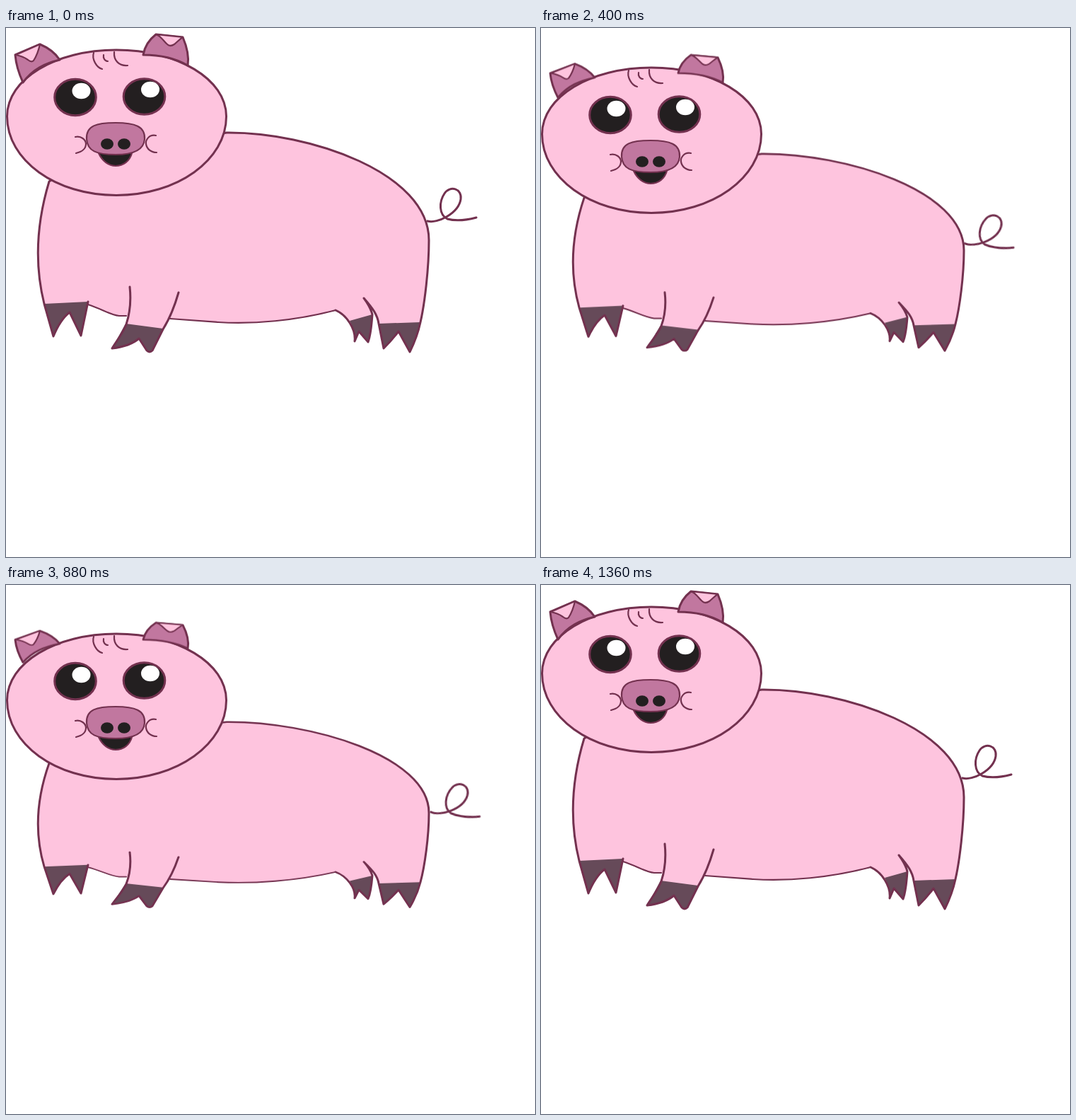
An HTML page that plays this animation: 748x748 px, repeating every 1480 ms.

```html
<!DOCTYPE html>
<html lang="en">
<head>
<meta charset="utf-8">
<title>Bouncing pig</title>
<style>
  html, body { margin: 0; width: 100%; height: 100%; overflow: hidden; background: #fff; }
  svg { display: block; width: 100%; height: 100%; }
  svg * { transform-box: view-box; transform-origin: 0 0; }
  .line { fill: none; stroke: #73314f; stroke-width: 3; stroke-linecap: round; stroke-linejoin: round; }
  .thin { stroke-width: 2.2; }
  .skin { fill: #fec4de; }
  .rose { fill: #c1779f; }
  .hoof { fill: #664a59; }
  .ink { fill: #231f20; }
  .white { fill: #fff; }
</style>
</head>
<body>
<svg viewBox="0 0 748 748">
  <g id="body">
    <path class="skin" d="M90 190 L61 217 C45 270 39 330 54 391 L116 388 V391 C135 397 148 406 160 407 H173 L169 420 L222 427 L232 411 L300 416 C350 419 410 414 466 399 C475 402 482 408 486 415 L518 406 L516 394 L527 419 L586 417 C592 390 598 340 598 300 C598 205 430 147 312 148 L250 170Z"/>
    <g class="hoof">
      <path d="M54 390 L67 436 C74 419 82 408 90 402 L106 435 L116 387Z"/>
      <path d="M169 418 L150 453 C166 451 180 446 188 439 L199 456 Q203 460 207 456 L222 425Z"/>
      <path d="M486 414 C491 424 494 434 493 443 L499 429 L512 444 C516 433 517 420 518 405Z"/>
      <path d="M527 418 L534 453 C542 445 549 437 555 429 L571 458 C578 444 583 430 586 416Z"/>
    </g>
    <g class="line">
      <path d="M66 214 L61 217 C45 270 39 330 54 390 L67 436 C74 419 82 408 90 402 L106 435 L116 387"/>
      <path d="M175 366 C177 385 176 401 170 419 C165 432 156 443 150 453 C166 451 180 446 188 439 L199 456 Q203 460 207 456 L222 426 C232 410 238 395 244 374"/>
      <path d="M466 399 C482 406 495 426 493 443 L499 429 L512 444 C516 433 517 420 518 405 Q515 394 506 382 C519 397 525 405 527 418 L534 453 C542 445 549 437 555 429 L571 458 C578 444 583 430 586 416 C592 390 598 340 598 300 C598 205 430 147 312 148 L306 149"/>
      <path class="thin" d="M116 391 C135 397 148 406 160 407 H170 M232 411 L300 416 C350 419 410 414 466 399"/>
    </g>
  </g>

  <path id="tail" class="line" d="M0 0 C14 4 44 -11 47 -31 C49 -46 32 -51 24 -39 C16 -27 16 -9 28 -3 C39 0 54 -1 69 -5"/>

  <g id="head" class="line">
    <path class="skin" d="M156 31 C242 31 311.5 72 311.5 125 C311.5 187 242 236.5 156 236.5 C70 236.5 1.5 187 1.5 125 C1.5 72 70 31 156 31Z"/>
    <path class="thin" d="M124 35 C121 44 128 56 136 58 M138 38 C137 43 140 47 144 47 M153 34 C152 46 160 54 172 53"/>
    <ellipse class="ink" cx="98" cy="98" rx="29.3" ry="25.7"/>
    <ellipse class="ink" cx="195.5" cy="97" rx="29.3" ry="25.3"/>
    <g class="white" stroke="none">
      <ellipse cx="106.5" cy="89" rx="13" ry="11.3"/>
      <ellipse cx="204" cy="87" rx="13" ry="11.3"/>
    </g>
    <path class="ink thin" d="M131 177 C136 188 145 195 155 195 C166 195 175 188 178 177Z"/>
    <path class="rose thin" d="M114 157 C113 138 128 134 155 134 C182 134 197 139 196 157 C195 173 180 179 155 179 C128 179 115 174 114 157Z"/>
    <g class="ink" stroke="none">
      <ellipse cx="143" cy="164" rx="9" ry="7.8"/>
      <ellipse cx="167" cy="164" rx="9" ry="7.8"/>
    </g>
    <path class="thin" d="M98 154 C106 152 113 158 113 164 C113 170 108 175 99 177 M212 152 C202 150 197 159 198 164 C199 171 205 176 213 176"/>
  </g>

  <g id="ears" class="line">
    <path class="rose" d="M13 38 L48 23 C60 28 70 36 76 45 C55 50 38 58 24 77 C17 62 14 50 13 38Z"/>
    <path class="skin thin" d="M14 38 L48 23 C46 32 43 40 39 46 Q36 49 31 45 Q24 40 14 38Z"/>
    <path class="rose" d="M212 9 L250 13 C256 27 259 40 257 53 C240 43 218 38 194 38 C196 26 203 16 212 9Z"/>
    <path class="skin thin" d="M212 9 L250 13 C245 16 242 20 238 23 Q232 27 228 23 C223 19 220 12 212 9Z"/>
  </g>
</svg>
<script>
  const LOOP = 1480, STEP = 40, LOW = 760, TOP = 1360;

  // Each pose is [time, transform]; motion between poses advances every STEP ms.
  function play(id, poses) {
    const frames = poses.map(([time, transform], i) => {
      const next = i + 1 < poses.length ? poses[i + 1][0] : LOOP;
      const count = Math.max(1, Math.round((next - time) / STEP));
      return { offset: time / LOOP, transform, easing: `steps(${count}, end)` };
    });
    document.getElementById(id).animate(frames, { duration: LOOP, iterations: Infinity, delay: -0.5 });
  }

  const squash = (y, s) => `translateY(${y}px) scaleY(${s})`;
  const place = (x, y, turn) => `translate(${x}px, ${y}px) rotate(${turn}deg)`;
  const bounce = (id, up, down) => play(id, [[0, up], [LOW, down], [TOP, up], [LOOP, up]]);

  bounce('body', squash(0, 1), squash(85.6, 0.8065));
  bounce('head', squash(0, 1), squash(47.5, 1));
  bounce('ears', squash(0, 1), squash(57.2, 0.785));

  const rest = place(596, 273, 0);
  play('tail', [
    [0, rest],
    [LOW, place(602, 333, 17.2)],
    [1000, place(599.6, 309, 1.7)],
    [1200, place(597.6, 289, 0)],
    [TOP, rest],
    [LOOP, rest]
  ]);
</script>
</body>
</html>
```
